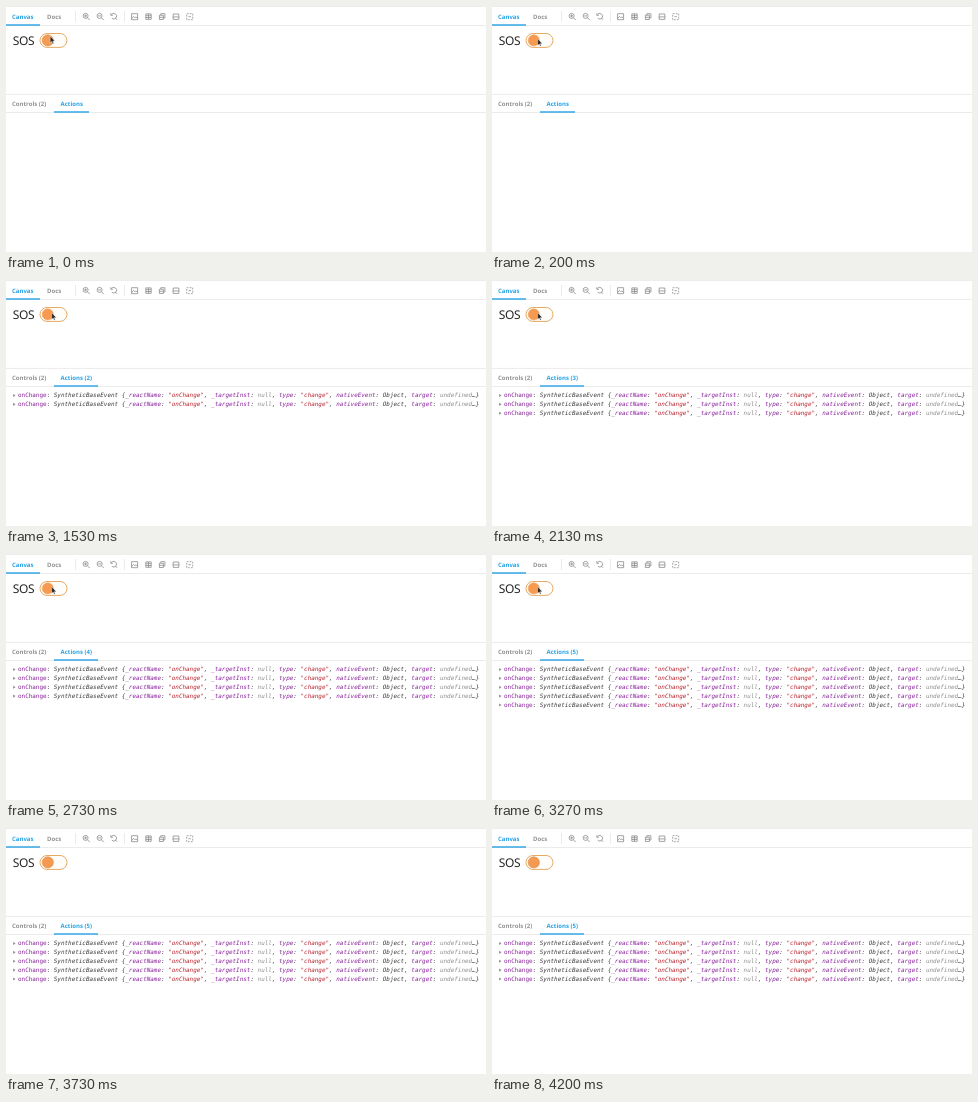
Animation, 480 px wide and 246 px high, one loop 4.47 s. Source, as an HTML page:

```html
<!DOCTYPE html>
<html lang="en">
<head>
<meta charset="utf-8">
<title>Toggle actions</title>
<style>
html, body { margin: 0; width: 100%; height: 100%; overflow: hidden; background: #fff; }
svg { display: block; width: 100%; height: 100%; text-rendering: geometricPrecision; }
.tab { font: 700 6px "Open Sans", sans-serif; fill: #929292; }
.on { fill: #27a3e6; }
.label { font: 12px "Noto Sans", sans-serif; letter-spacing: -.3px; fill: #262626; }
.row text { font: italic 5.95px "DejaVu Sans Mono", monospace; fill: #3a3a3a; white-space: pre; }
.row .head { font-style: normal; }
.key { fill: #88209a; }
.str { fill: #b8222c; }
.nil { fill: #8c8c8c; }
.line { stroke: #e6e6e8; stroke-width: .8; fill: none; }
.icons { fill: none; stroke: #8c8c8c; stroke-width: .8; }
</style>
</head>
<body>
<svg viewBox="0 0 480 246">
  <path class="line" d="M0 .4H480M0 19.5H480M0 88.4H480M0 106.5H480M69.5 5V16M118.5 5V16"/>
  <rect class="on" y="18.3" width="34" height="1.4"/>
  <text class="tab on" x="6" y="12.8">Canvas</text>
  <text class="tab" x="41" y="12.8">Docs</text>

  <g class="icons">
    <g id="lens"><circle cx="79.6" cy="9.9" r="2.5"/><path d="M81.5 11.8L83.8 14.1M78.2 9.9H81"/></g>
    <path d="M79.6 8.5V11.3"/>
    <use href="#lens" x="14"/>
    <path d="M105.3 8.9A2.8 2.8 0 1 1 105.8 12.2M104.8 7.2V9.3H106.9M109.4 12L111 13.8"/>
    <path d="M125.6 7.7H131.6V13.7H125.6ZM125.6 12.6L127.6 10.4L129 11.8L130 10.8L131.6 12.4"/>
    <path d="M139.8 7.9H145.2V13.3H139.8ZM142.5 7.9V13.3M139.8 9.7H145.2M139.8 11.5H145.2"/>
    <path d="M153.4 9.2H157.4V13.5H153.4ZM154.8 9.2V7.7H158.9V12H157.4M153.4 11.3H157.4"/>
    <path d="M167.2 10.6V8H172.8V10.6M166.4 10.9H173.6M167.2 11V13.4H172.8V11"/>
    <path d="M180.7 7.7H186.7V13.7H180.7Z" stroke-dasharray="1.8 1.2"/>
    <path d="M182.5 10.7H184.9"/>
  </g>

  <text class="label" x="6.7" y="39.3">SOS</text>
  <rect x="34" y="27.5" width="27" height="13.9" rx="6.95" fill="#fffdfa" stroke="#e6aa62"/>
  <circle id="knob" cx="41.8" cy="34.4" r="5.6" fill="#f59a50" stroke-width=".6"/>

  <text class="tab" x="6" y="100.3">Controls (2)</text>
  <text class="tab on" id="count" x="54.6" y="100.3">Actions</text>
  <rect class="on" id="bar" x="48" y="105.3" width="35" height="1.4"/>
  <g id="log"></g>
  <path id="cursor" d="M0 0V6.6L1.5 5.3L2.5 7.5L3.5 7L2.5 4.9H4.6Z" fill="#222" stroke="#fff" stroke-width=".4"/>
</svg>
<script>
const LOOP = 4470;
const clicks = [800, 1530, 2130, 2730, 3270];
const $ = id => document.getElementById(id);
const span = (kind, text) => `<tspan class="${kind}">${text}</tspan>`;
const pair = (key, kind, value) => span("key", key) + ": " + span(kind, value);

const fields = [
  ["_reactName", "str", '"onChange"'],
  ["_targetInst", "nil", "null"],
  ["type", "str", '"change"'],
  ["nativeEvent", "obj", "Object"],
  ["target", "nil", "undefined"]
].map(f => pair(...f)).join(", ");

$("log").innerHTML = clicks.map((_, i) => `
  <g class="row" transform="translate(0 ${117.4 + i * 8.87})">
    <path d="M7.2 -3.5L9.5 -1.9L7.2 -.3Z" fill="#888"/>
    <text x="12">${span("head key", "onChange")}${span("head", ": ")}SyntheticBaseEvent {${fields}…}</text>
  </g>`).join("");
const rows = [...$("log").children];

const ease = (t, from, to) => {
  const u = Math.min(1, Math.max(0, (t - from) / (to - from)));
  return u * u * (3 - 2 * u);
};

function draw(t) {
  const n = clicks.filter(c => t >= c).length;
  rows.forEach((row, i) => row.setAttribute("display", i < n ? "inline" : "none"));
  $("count").textContent = n ? `Actions (${n})` : "Actions";
  $("bar").setAttribute("width", n ? 44 : 35);

  const enter = ease(t, 30, 200), leave = ease(t, 3390, 3680);
  const x = 44.2 + 1.5 * enter + 16 * leave;
  const y = 30.2 + 2.6 * enter - 9 * leave;
  $("cursor").setAttribute("transform", `translate(${x} ${y})`);
  $("cursor").setAttribute("display", t < 3670 ? "inline" : "none");
  $("knob").setAttribute("stroke", t < 135 || t >= 3600 ? "#d48a48" : "#f2a665");
}

const start = performance.now();
function tick() {
  draw((performance.now() - start) % LOOP);
  requestAnimationFrame(tick);
}
tick();
</script>
</body>
</html>
```
